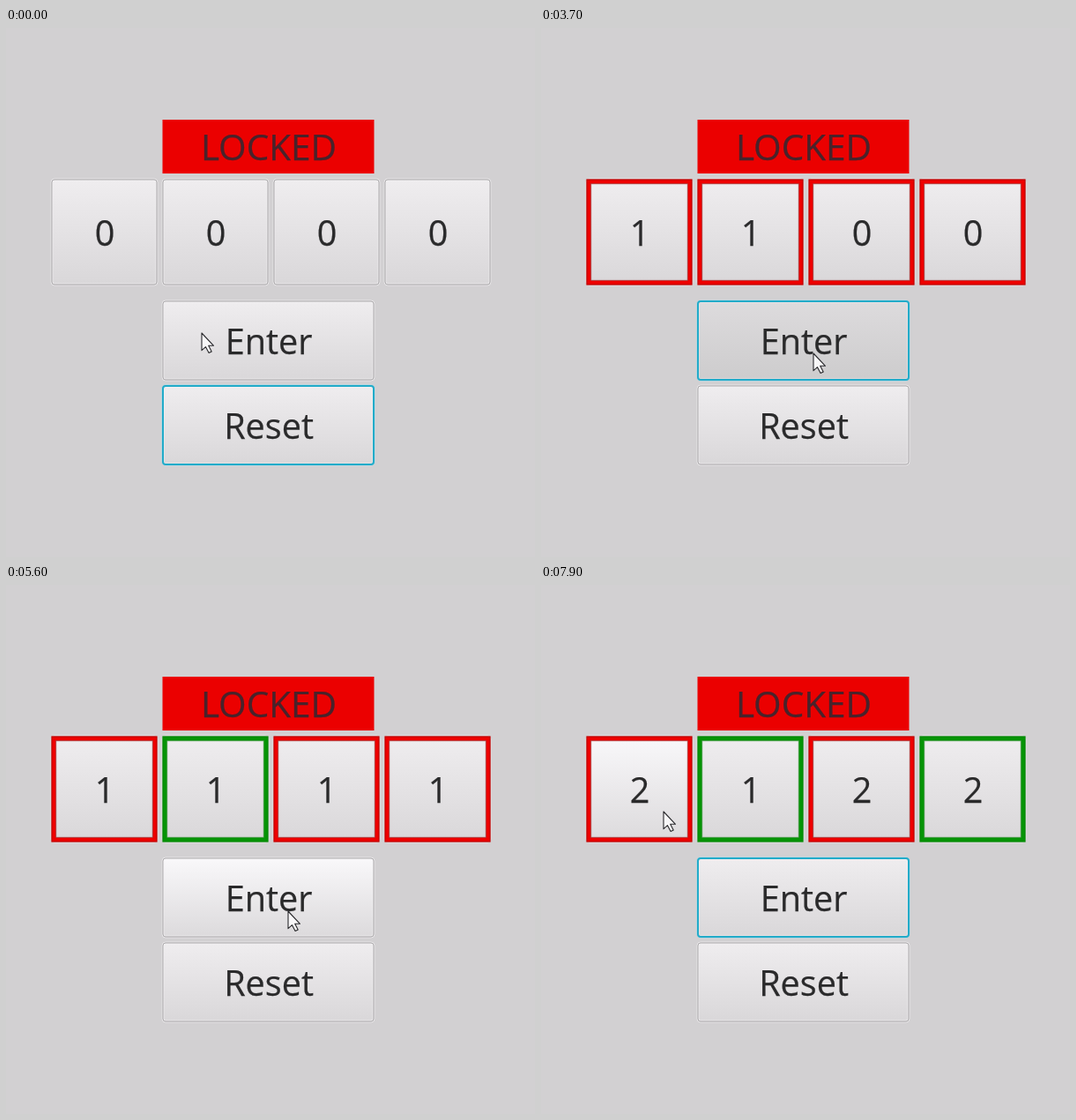
These frames come from a looping animation (600 px wide and 600 px high, 8 s). An HTML page:

```html
<!DOCTYPE html>
<html lang="en">
<head>
<meta charset="utf-8">
<title>Combination lock</title>
<style>
html, body { margin: 0; width: 100%; height: 100%; overflow: hidden; background: #d2d0d2; }
svg { display: block; width: 100vw; height: 100vh; }
text { font: 39.6px "Open Sans", "Noto Sans", sans-serif; text-anchor: middle; fill: #2a2a2b; stroke: #2a2a2b; stroke-width: .25; }
.frame { fill: none; stroke: #adabad; }
.shine { fill: none; stroke: #f5f4f5; stroke-opacity: .6; }
.face { fill: url(#plain); }
.hover .face { fill: url(#lit); }
.pressed .face { fill: url(#dark); }
.glow, .mark, .edge { fill: none; visibility: hidden; }
.glow { stroke: #8fcfdf; stroke-width: 4; stroke-opacity: .45; }
.focus .frame { stroke: #22abc9; stroke-width: 2; }
.focus .glow { visibility: visible; }
.mark { stroke-width: 5; }
.edge { stroke-opacity: .6; }
.red .mark, .green .mark, .red .edge, .green .edge { visibility: visible; }
.red .mark { stroke: #ee0000; }
.red .edge { stroke: #8c0000; }
.green .mark { stroke: #069406; }
.green .edge { stroke: #067c06; }
.red .frame, .green .frame, .red .glow, .green .glow { visibility: hidden; }
.status { font-size: 40.5px; fill: #48232b; stroke: #48232b; }
</style>
</head>
<body>
<svg viewBox="0 0 600 600">
  <defs>
    <linearGradient id="plain" x2="0" y2="1"><stop stop-color="#efedef"/><stop offset="1" stop-color="#d9d7d9"/></linearGradient>
    <linearGradient id="lit" x2="0" y2="1"><stop stop-color="#f9f8fa"/><stop offset="1" stop-color="#dcdadc"/></linearGradient>
    <linearGradient id="dark" x2="0" y2="1"><stop stop-color="#dddbdd"/><stop offset="1" stop-color="#cdcccd"/></linearGradient>
  </defs>
  <rect x="177.5" y="104" width="240" height="61" fill="#eb0000"/>
  <text class="status" x="298" y="150">LOCKED</text>
  <g id="buttons"></g>
  <path id="cursor" d="M.5 .5V20.2L5 16.2L8.6 23L11.7 21.4L8.2 14.8H14Z"
    fill="#f8f7f8" stroke="#29292c" stroke-width="1.1" stroke-linejoin="round"/>
</svg>
<script>
const LOOP = 8000, STEP = 100;
const ENTER = 4, RESET = 5;
const SECRET = [4, 1, 5, 2];

// Pointer stops; dx, dy are measured from the middle of the button.
const click = (time, id, dx = 11, dy = 14) => ({ time, id, dx, dy, press: true });
const rest = (time, id, dx, dy) => ({ time, id, dx, dy });
const stops = [
  rest(0, ENTER, -76, -9), rest(700, ENTER, -145, -42), rest(1900, 0, 29, 30),
  click(2200, 0), click(2800, ENTER, -60, -5),
  click(3400, 1), click(3800, ENTER),
  click(4600, 3, 11, -8), click(5100, 2), click(5800, ENTER, 22, 15),
  click(6300, 0), click(6800, 3), click(7200, ENTER, 36, -9),
  click(7500, 2), click(7700, ENTER), rest(7900, 0, 27, 25)
];
const clicks = stops.filter(s => s.press);

const group = document.getElementById("buttons");
const cursor = document.getElementById("cursor");

function addButton(x, y, w, h, label) {
  const rect = (cls, d, r) =>
    `<rect class="${cls}" x="${x + d}" y="${y + d}" width="${w - 2 * d}" height="${h - 2 * d}" rx="${r}"/>`;
  const g = document.createElementNS("http://www.w3.org/2000/svg", "g");
  g.innerHTML = rect("shine", -.5, 4) + rect("glow", .5, 4) + rect("face", .5, 3) +
    rect("shine", 1.5, 2) + rect("frame", .5, 3) + rect("mark", 2.5, 0) +
    rect("edge", .5, 0) + rect("edge", 5.2, 0) +
    `<text x="${x + w / 2 + .5}" y="${y + h / 2 + 15}">${label}</text>`;
  group.append(g);
  return { g, text: g.lastChild, x, y, w, h };
}

const buttons = [0, 1, 2, 3].map(i => addButton(51.5 + 126 * i, 171.5, 120, 120, 0));
["Enter", "Reset"].forEach((label, i) => buttons.push(addButton(177.5, 309.5 + 96 * i, 240, 90, label)));

function place({ id, dx, dy }) {
  const b = buttons[id];
  return [b.x + b.w / 2 + dx, b.y + b.h / 2 + dy];
}

// Between two stops the pointer lingers, glides, then settles.
function pointer(t) {
  if (t < 0 || (t >= 1200 && t < 1900)) return null;
  const next = stops.findIndex(s => s.time > t);
  if (next < 0) return place(stops[stops.length - 1]);
  const a = stops[next - 1], b = stops[next];
  const gone = (t - a.time) / (b.time - a.time);
  const p = Math.min(1, Math.max(0, (gone - .2) / .5));
  const ease = p * p * (3 - 2 * p);
  const end = place(b);
  return place(a).map((v, i) => t < 1200 || a.time >= 1900 ? v + (end[i] - v) * ease : v);
}

function stateAt(t) {
  const digits = [0, 0, 0, 0];
  let focus = RESET, held = -1, marks = [];
  for (const { time, id } of clicks) {
    if (t < time - STEP) break;
    focus = id;
    if (t < time) held = id;
    else if (id === ENTER) marks = digits.map((d, i) => d === SECRET[i] ? "green" : "red");
    else digits[id]++;
  }
  return { digits, focus, held, marks };
}

const inside = (p, b) => p && p[0] > b.x && p[0] < b.x + b.w && p[1] > b.y && p[1] < b.y + b.h;

function draw(t) {
  const { digits, focus, held, marks } = stateAt(t);
  const tip = pointer(t);
  const felt = pointer(t - STEP / 2); // hover lags a little
  buttons.forEach((b, i) => {
    const look = i === held ? "pressed" : inside(felt, b) ? "hover" : "";
    b.g.setAttribute("class", `${look} ${i === focus ? "focus" : ""} ${marks[i] || ""}`);
    if (i < ENTER) b.text.textContent = digits[i];
  });
  cursor.style.visibility = tip ? "visible" : "hidden";
  if (tip) cursor.setAttribute("transform", `translate(${tip})`);
}

function tick() {
  const t = performance.now() % LOOP;
  draw(Math.floor(t / STEP) * STEP);
  requestAnimationFrame(tick);
}
tick();
</script>
</body>
</html>
```
